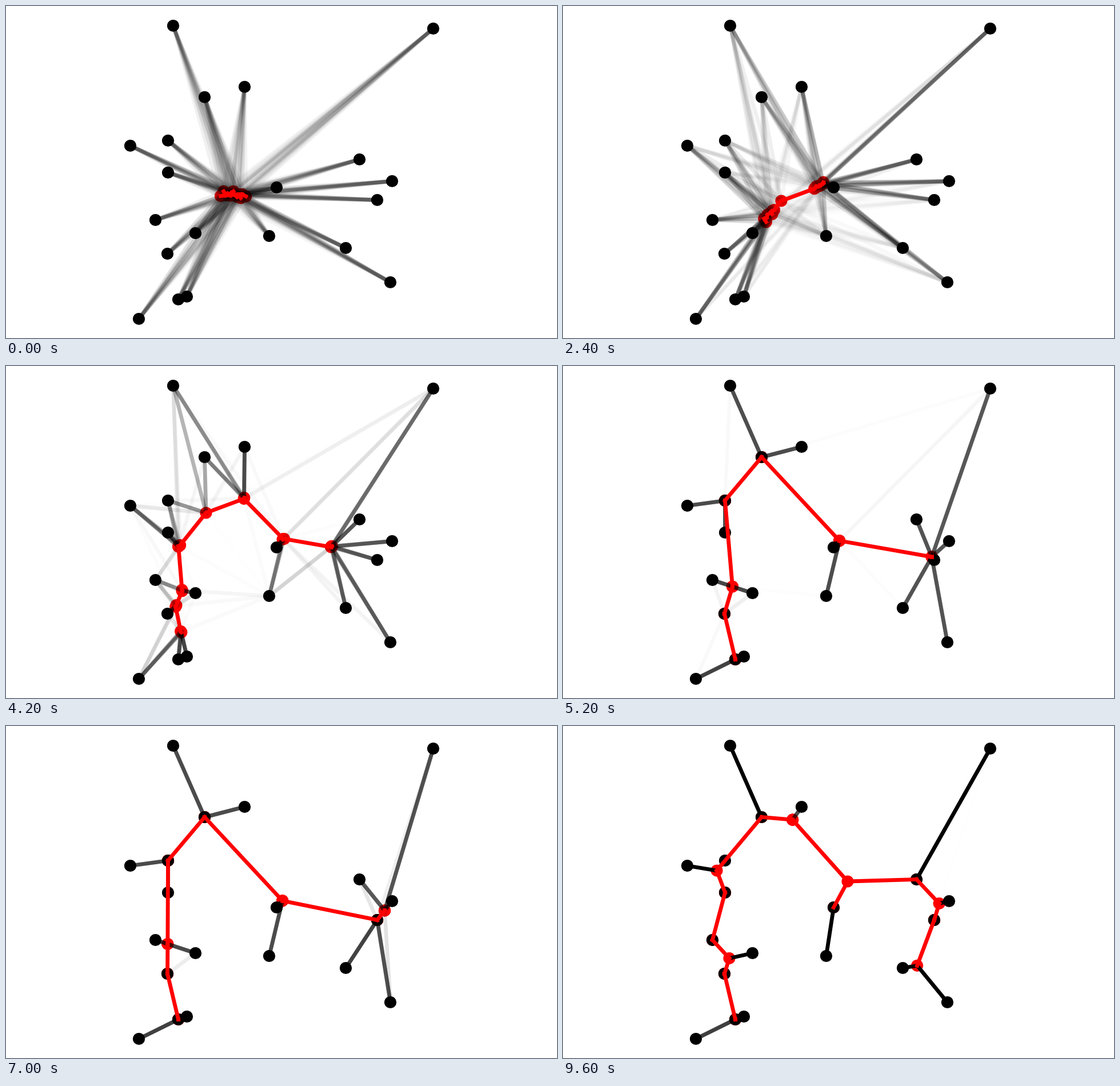
These frames come from a looping animation (964x581 px, 9800 ms). An HTML page with a canvas:

```html
<!DOCTYPE html>
<html>
<head>
<meta charset="utf-8">
<style>
html, body { margin: 0; width: 964px; height: 581px; overflow: hidden; background: #fff; }
canvas { display: block; }
</style>
</head>
<body>
<canvas id="stage" width="964" height="581"></canvas>
<script>
const ctx = document.getElementById('stage').getContext('2d');
const STEP = 200, STEPS = 49;

// The points to be connected; the rules below call them a, b, c, ... in this order.
const points = [
  [232, 547], [316, 508], [301, 513], [282, 433], [331, 397], [261, 374], [283, 291],
  [217, 244], [283, 235], [292, 34], [347, 159], [417, 141], [473, 317], [460, 402],
  [747, 39], [618, 268], [675, 306], [649, 339], [594, 423], [672, 483]
];

let seed = 7;
const random = () => (seed = seed * 16807 % 2147483647) / 2147483647;
const mix = (a, b, k) => a + (b - a) * k;
const distance = (a, b) => Math.hypot(a[0] - b[0], a[1] - b[1]);
const mean = (list, weights) => {
  const total = weights.reduce((sum, w) => sum + w, 0);
  return [0, 1].map(axis => list.reduce((sum, p, i) => sum + p[axis] * weights[i], 0) / total);
};

// Point with the least total distance to a group (Weiszfeld iteration).
function median(group) {
  let center = mean(group, group.map(() => 1));
  for (let i = 0; i < 200; i++) {
    center = mean(group, group.map(p => 1 / Math.max(distance(p, center), 0.1)));
  }
  return center;
}

// 'def2' puts two nodes at the median of points d, e and f.
function medians(rule) {
  return rule.split(' ').flatMap(word => {
    const [, letters, count] = word.match(/([a-t]+)(\d*)/);
    const center = median([...letters].map(c => points[c.charCodeAt(0) - 97]));
    return Array(+count || 1).fill(center);
  });
}

// Nodes scattered loosely from one place to another.
function cluster(from, to, count, jitter) {
  return Array.from({ length: count }, (_, i) =>
    from.map((v, axis) => mix(v, to[axis], i / (count - 1)) + (random() * 2 - 1) * jitter));
}

const tree = medians('abcd2 d2 def f g2 ghi k klm3 lmp m p pqr r2 rst');
const poses = [
  { step: 0, sharpness: 0.5, nodes: cluster([381, 327], [414, 332], 20, 6) },
  { step: 9, sharpness: 0.9, nodes: cluster([385, 343], [427, 318], 20, 5) },
  { step: 16, sharpness: 0.7, nodes: [
    ...cluster([310, 416], [323, 389], 9, 3), [352, 354],
    ...cluster([483, 303], [496, 296], 10, 2)] },
  { step: 26, sharpness: 1.6, nodes: medians('abcd2 d2 ef2 ghik3 k3 klmnpr3 mopqrst5') },
  { step: 35, sharpness: 4, nodes: medians('abcd2 d2 defg2 ghik3 k3 klmnpr3 qr3 r2') },
  { step: 42, sharpness: 5, nodes: tree },
  { step: 48, sharpness: 9, nodes: tree }
];

function stateAt(step) {
  const i = Math.max(1, poses.findIndex(p => p.step >= step));
  const a = poses[i - 1], b = poses[i];
  const k = (step - a.step) / (b.step - a.step);
  return {
    sharpness: mix(a.sharpness, b.sharpness, k),
    nodes: a.nodes.map((n, j) => n.map((v, axis) => mix(v, b.nodes[j][axis], k)))
  };
}

function spanningTree(nodes) {
  const inside = [nodes[0]], outside = nodes.slice(1), edges = [];
  while (outside.length) {
    let best = { length: Infinity };
    for (const a of inside) {
      outside.forEach((b, index) => {
        const length = distance(a, b);
        if (length < best.length) best = { length, a, b, index };
      });
    }
    edges.push([best.a, best.b]);
    inside.push(best.b);
    outside.splice(best.index, 1);
  }
  return edges;
}

function line(a, b, color, alpha = 1) {
  ctx.globalAlpha = alpha;
  ctx.strokeStyle = color;
  ctx.beginPath();
  ctx.moveTo(...a);
  ctx.lineTo(...b);
  ctx.stroke();
  ctx.globalAlpha = 1;
}

function dot([x, y], color) {
  ctx.fillStyle = color;
  ctx.beginPath();
  ctx.arc(x, y, 10.6, 0, Math.PI * 2);
  ctx.fill();
}

function draw(step) {
  const { nodes, sharpness } = stateAt(step);
  ctx.setTransform(1, 0, 0, 1, 0.5, 0.5);
  ctx.clearRect(-1, -1, 966, 583);
  ctx.lineWidth = 6.8;
  ctx.lineCap = 'square';

  nodes.forEach(n => dot(n, '#f00'));
  // Soft membership of every point in every node sets the line opacity.
  for (const p of points) {
    const weights = nodes.map(n => Math.exp(-sharpness * Math.sqrt(distance(p, n))));
    const total = weights.reduce((sum, w) => sum + w, 0);
    nodes.forEach((n, j) => line(p, n, '#000', weights[j] / total));
  }
  points.forEach(p => dot(p, '#000'));
  spanningTree(nodes).forEach(([a, b]) => line(a, b, '#f00'));
}

let shown = -1;
function tick() {
  const step = Math.floor(performance.now() / STEP) % STEPS;
  if (step !== shown) draw(shown = step);
  requestAnimationFrame(tick);
}
tick();
</script>
</body>
</html>
```
